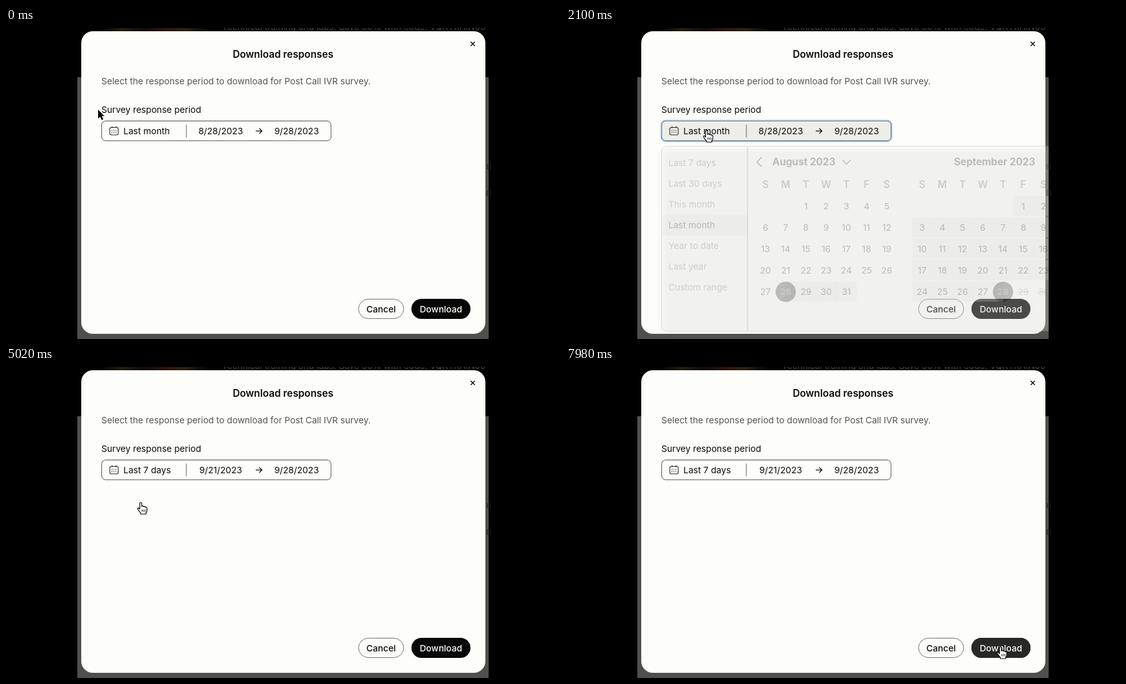
Animation of 854 by 480 pixels, one loop 8 s. Source, as an HTML page with a canvas:

```html
<!DOCTYPE html>
<html lang="en">
<head>
<meta charset="utf-8">
<title>Download responses</title>
<style>
html, body { margin: 0; width: 854px; height: 480px; overflow: hidden; background: #000; }
canvas { display: block; }
</style>
</head>
<body>
<canvas id="stage" width="854" height="480"></canvas>
<script>
const ctx = document.getElementById('stage').getContext('2d');
const LOOP = 8000;
const PAPER = '#fdfdf9', INK = '#0a0a0a', MUTED = '#545452', RANGE = '#dcdcda';
const HOVER = '#e3e3df', FAINT = '#8c8c8a';

const clamp = v => Math.max(0, Math.min(1, v));
const span = (t, a, b) => clamp((t - a) / (b - a));
const outQuad = p => 1 - (1 - p) ** 2;
const outCubic = p => 1 - (1 - p) ** 3;

function text(str, x, y, { size = 13.65, weight = 400, color = INK, align = 'left' } = {}) {
  ctx.font = `${weight} ${size}px Inter, "Liberation Sans", sans-serif`;
  ctx.textAlign = align;
  ctx.fillStyle = color;
  ctx.fillText(str, x, y);
}

function box(x, y, w, h, r, fill, stroke, width = 1) {
  ctx.beginPath();
  ctx.roundRect(x, y, w, h, r);
  if (fill) { ctx.fillStyle = fill; ctx.fill(); }
  if (stroke) { ctx.strokeStyle = stroke; ctx.lineWidth = width; ctx.stroke(); }
}

function rect(x, y, w, h, fill) {
  ctx.fillStyle = fill;
  ctx.fillRect(x, y, w, h);
}

function line(points, color = INK, width = 1.4) {
  ctx.beginPath();
  points.forEach(([x, y]) => ctx.lineTo(x, y));
  ctx.strokeStyle = color;
  ctx.lineWidth = width;
  ctx.stroke();
}

function disc(x, y, r, fill) {
  ctx.beginPath();
  ctx.arc(x, y, r, 0, Math.PI * 2);
  ctx.fillStyle = fill;
  ctx.fill();
}

function faded(alpha, draw) {
  if (alpha <= 0) return;
  ctx.save();
  ctx.globalAlpha = alpha;
  draw();
  ctx.restore();
}

function backdrop() {
  rect(0, 0, 854, 480, '#000');
  rect(110, 76, 634, 404, '#4f4f4d');
  const glow = ctx.createLinearGradient(145, 0, 312, 0);
  ['#000', '#241f0c', '#100a04', '#30140a', '#28220c', '#000']
    .forEach((c, i) => glow.addColorStop(i / 5, c));
  rect(145, 0, 167, 5, glow);
  text('Technical training and labs. Save 50% with code: VQKTRAIN50', 333, 3, { color: '#484840' });
  text('u', 740, 218, { color: '#20201e' });
  text('0', 740, 260, { color: '#20201e' });
}

function modal(hot) {
  box(116, 5, 623, 467, 18, PAPER);
  text('Download responses', 427, 46, { size: 15.3, weight: 600, align: 'center' });
  line([[716.3, 21.3], [722.7, 27.7]], INK, 1.3);
  line([[722.7, 21.3], [716.3, 27.7]], INK, 1.3);
  text('Select the response period to download for Post Call IVR survey.', 147, 87, { color: MUTED });
  text('Survey response period', 147, 130.5);
  box(543.5, 418.5, 69.5, 30, 15, PAPER, '#777775');
  text('Cancel', 578.2, 438.8, { weight: 500, align: 'center' });
  box(625, 418, 91, 31, 15.5, '#070707');
  faded(hot, () => box(625, 418, 91, 31, 15.5, '#282826'));
  text('Download', 670.4, 438.8, { weight: 500, color: PAPER, align: 'center' });
}

function calendarIcon() {
  box(160, 153.5, 13, 11.5, 2.5, null, '#2b2b2a', 1.1);
  line([[163.5, 151.5], [163.5, 154.5]], '#2b2b2a', 1.1);
  line([[169.5, 151.5], [169.5, 154.5]], '#2b2b2a', 1.1);
  for (let i = 0; i < 6; i++) rect(162.7 + (i % 3) * 3, 157.5 + (i > 2 ? 3 : 0), 1.4, 1.4, MUTED);
}

function field(hover, focus, week) {
  box(147.5, 143.5, 353.5, 30.5, 6, PAPER, '#555553');
  faded(hover, () => box(147.5, 143.5, 353.5, 30.5, 6, HOVER, '#555553'));
  faded(focus, () => {
    box(145.3, 141.3, 358, 35, 8.5, null, '#a9d3ee', 2);
    box(147, 143, 354.6, 31.6, 6.5, PAPER, '#1c62a6', 2.6);
  });
  calendarIcon();
  text(week ? 'Last 7 days' : 'Last month', 181, 164);
  line([[278, 149], [278, 169]], '#666664', 1);
  text(week ? '9/21/2023' : '8/28/2023', 331, 163.8, { align: 'center' });
  line([[385, 159], [394.5, 159]], INK, 1.2);
  line([[390.5, 155], [394.5, 159], [390.5, 163]], INK, 1.2);
  text('9/28/2023', 448, 163.8, { align: 'center' });
}

const STEP = 31.17;
const rowY = r => 274.5 + r * 33.1;

function month(x0, first, days, ranged, picked) {
  const place = d => {
    const n = d - 1 + first;
    return [x0 + (n % 7) * STEP, rowY(Math.floor(n / 7))];
  };
  [...'SMTWTFS'].forEach((s, i) =>
    text(s, x0 + i * STEP, 247.3, { size: 15.3, weight: 600, color: MUTED, align: 'center' }));
  for (let d = 1; d <= days; d++) {
    const [x, y] = place(d);
    if (!ranged(d)) continue;
    const left = d === 28 && days === 31 ? x : x - STEP / 2;
    const right = d === 28 && days === 30 ? x : x + STEP / 2 + 0.3;
    rect(left, y - 15.5, right - left, 31, RANGE);
  }
  for (let d = 1; d <= days; d++) {
    const [x, y] = place(d);
    const on = d === picked, off = days === 30 && d > picked;
    if (on) disc(x, y + 0.3, 15.6, '#060606');
    text(d, x, y + 5, {
      weight: on ? 700 : 400, align: 'center',
      color: on ? PAPER : off ? FAINT : INK
    });
    if (off) line([[x - 9, y + 0.5], [x + 9, y + 0.5]], FAINT, 1);
  }
}

const PRESETS = ['Last 7 days', 'Last 30 days', 'This month', 'Last month',
  'Year to date', 'Last year', 'Custom range'];

function popup(rowHover) {
  ctx.save();
  ctx.shadowColor = 'rgba(110,110,100,.5)';
  ctx.shadowBlur = 11;
  ctx.shadowOffsetY = 3;
  box(147.5, 182.5, 640, 285, 8, PAPER);
  ctx.restore();
  box(147.5, 182.5, 640, 285, 8, null, '#8d8d8b');
  PRESETS.forEach((name, i) => {
    const y = 207.8 + i * 32.13;
    if (i === 3) rect(148, y - 15.8, 132, 31.6, RANGE);
    if (i === 0 && rowHover) rect(148, y - 15.8, 132, 31.6, HOVER);
    text(name, 158, y + 4.8, { color: i === 3 ? INK : '#5b5b59' });
  });
  line([[280, 183], [280, 467]], '#777775', 1.2);
  line([[301.5, 199.5], [294.3, 206.8], [301.5, 214]]);
  text('August 2023', 318, 212.2, { size: 15.3, weight: 700 });
  line([[426.3, 203.8], [432.5, 210], [438.7, 203.8]]);
  text('September 2023', 598, 212.2, { size: 15.3, weight: 700 });
  line([[743, 199.5], [750.2, 206.8], [743, 214]]);
  month(307.5, 2, 31, d => d >= 28, 28);
  month(549, 5, 30, d => d <= 28, 28);
}

const ARROW = new Path2D('M0 0V13.8L3.2 10.9L5.5 16L8 14.9L5.8 9.9H9.8Z');
const HAND = new Path2D('M-1.8 10.5V1.6Q-1.8 0-.3 0Q1.2 0 1.2 1.6V6.3Q1.5 5.3 2.8 5.4Q4 5.5 4.1 6.8' +
  'Q4.5 5.9 5.7 6.1Q6.8 6.3 6.9 7.6Q7.4 6.9 8.3 7.2Q9.3 7.6 9.3 9V12.5Q9.2 14.5 7.8 16V18H-.4V16.3' +
  'Q-3 13.6-4.7 10.8Q-5.6 9-4.3 8.5Q-3.2 8.2-1.8 10.5Z');

function cursor(x, y, hand) {
  ctx.save();
  ctx.translate(x, y);
  ctx.lineJoin = 'round';
  if (hand) {
    ctx.fillStyle = '#fff';
    ctx.fill(HAND);
    ctx.strokeStyle = INK;
    ctx.lineWidth = 1.2;
    ctx.stroke(HAND);
    for (const fx of [1.8, 4.1, 6.4]) line([[fx, 11], [fx, 14.5]], INK, 0.9);
  } else {
    ctx.strokeStyle = '#fff';
    ctx.lineWidth = 2;
    ctx.stroke(ARROW);
    ctx.fillStyle = '#000';
    ctx.fill(ARROW);
  }
  ctx.restore();
}

// start, end, target x, target y, easing along x
const MOVES = [
  [20, 900, 217, 158, outQuad],
  [3060, 3940, 208, 209, outQuad],
  [5440, 6300, 567, 326, outQuad],
  [6860, 7760, 670, 432, outCubic]
];

function pointer(t) {
  let x = 142, y = 126;
  for (const [a, b, tx, ty, easeX] of MOVES) {
    const p = span(t, a, b);
    x += (tx - x) * easeX(p);
    y += (ty - y) * outQuad(p);
  }
  return [x, y];
}

function click(t, start, x, y) {
  const r = 29.5 * outQuad(span(t, start, start + 240));
  if (r <= 0) return;
  faded(1 - span(t, start + 530, start + 590), () => {
    ctx.beginPath();
    ctx.arc(x, y, r, 0, Math.PI * 2);
    ctx.strokeStyle = INK;
    ctx.lineWidth = 1.8;
    ctx.stroke();
  });
}

function draw(t) {
  const [x, y] = pointer(t);
  const open = span(t, 1980, 2500) * (1 - span(t, 4600, 4880));
  const hover = t < 3000 ? span(t, 820, 1100) * (1 - span(t, 1980, 2500)) : 0;
  ctx.save();
  backdrop();
  ctx.beginPath();
  ctx.rect(110, 0, 634, 480);
  ctx.clip();
  modal(span(t, 7660, 7960));
  field(hover, open, t >= 4740);
  faded(open, () => popup(t > 3060 && y > 192));
  click(t, 1260, 217, 159);
  click(t, 4200, 208, 210);
  cursor(x, y, (t >= 840 && t < 5440) || t >= 7680);
  ctx.restore();
}

function tick() {
  draw(performance.now() % LOOP);
  requestAnimationFrame(tick);
}
tick();
</script>
</body>
</html>
```
